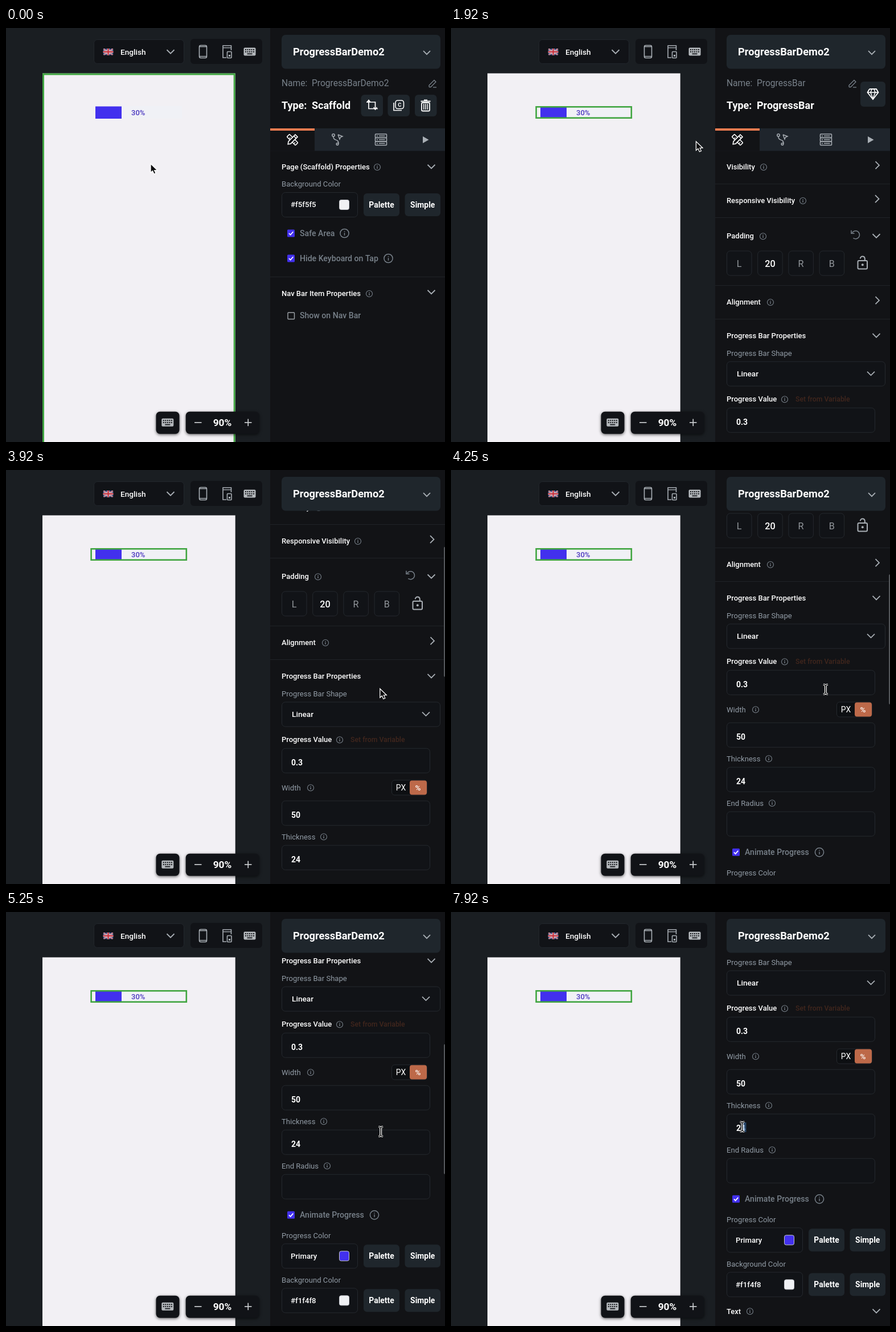
Recreate the animation shown at these times as an HTML page with a canvas. Size 771x726 px, loop 8 s.

```html
<!DOCTYPE html>
<html lang="en">
<head>
<meta charset="utf-8">
<title>Progress bar settings</title>
<style>
html, body { margin: 0; width: 100%; height: 100%; overflow: hidden; background: #121316; }
canvas { display: block; }
</style>
</head>
<body>
<canvas id="stage" width="771" height="726"></canvas>
<script>
const g = document.getElementById('stage').getContext('2d');
const LOOP = 8000, STEP = 1000 / 12;
const SELECT_AT = 830, PANEL_AT = 910, MARK_AT = 7740;

const C = {
  left: '#1a1e22', panel: '#121316', box: '#111317', raised: '#1f262c', edge: '#25292e',
  rule: '#202327', white: '#ffffff', label: '#929ca6', dim: '#78818a', icon: '#a9afb5',
  page: '#f2f0f4', green: '#40a540', blue: '#4230ee', orange: '#ee7b50', chip: '#bd6949'
};

// time, value
const SCROLL = [[3333, 0], [3417, 3], [3667, 85], [3917, 178], [4250, 315], [4583, 395],
  [4917, 424], [5250, 454], [5500, 482]];
// time, x, y, eased
const POINTER = [[0, 255, 239, 0], [830, 232, 150, 1], [1080, 232, 150, 0], [1917, 431.5, 200, 0],
  [2750, 657.5, 384, 0], [6500, 658.5, 385.5, 0], [7500, 511.5, 376.5, 1]];
const INPUTS = [666, 758, 836, 914];

function track(keys, t, i) {
  if (t <= keys[0][0]) return keys[0][i];
  for (let k = 1; k < keys.length; k++) {
    const a = keys[k - 1], b = keys[k];
    if (t < b[0]) {
      let p = (t - a[0]) / (b[0] - a[0]);
      if (b[3]) p = p * p * (3 - 2 * p);
      return a[i] + (b[i] - a[i]) * p;
    }
  }
  return keys[keys.length - 1][i];
}

function rect(x, y, w, h, color) {
  g.fillStyle = color;
  g.fillRect(x, y, w, h);
}

function box(x, y, w, h, r, fill, stroke, lw = 1) {
  g.beginPath();
  g.roundRect(x, y, w, h, r);
  if (fill) { g.fillStyle = fill; g.fill(); }
  if (stroke) { g.strokeStyle = stroke; g.lineWidth = lw; g.stroke(); }
}

// y is the middle of the capitals
function text(s, x, y, size = 13, color = C.white, weight = 500, align = 'left') {
  g.font = `${weight} ${size}px Roboto, sans-serif`;
  g.textAlign = align;
  g.fillStyle = color;
  g.fillText(s, x, y + size * 0.355 - 0.4);
}

function path(pts, color, lw = 1.6, fill) {
  g.beginPath();
  for (let i = 0; i < pts.length; i += 2) g.lineTo(pts[i], pts[i + 1]);
  if (fill) { g.closePath(); g.fillStyle = fill; g.fill(); }
  if (color) { g.strokeStyle = color; g.lineWidth = lw; g.stroke(); }
}

function circle(x, y, r, color, lw) {
  g.beginPath();
  g.arc(x, y, r, 0, 7);
  if (lw) { g.strokeStyle = color; g.lineWidth = lw; g.stroke(); }
  else { g.fillStyle = color; g.fill(); }
}

function at(x, y, draw, turn = 0) {
  g.save();
  g.translate(x, y);
  g.rotate(turn);
  draw();
  g.restore();
}

const down = (x, y, r = 6.5) => path([x - r, y - r / 2, x, y + r / 2, x + r, y - r / 2], C.icon, 1.8);
const right = (x, y) => path([x - 3.5, y - 6.5, x + 3, y, x - 3.5, y + 6.5], C.icon, 1.8);
const rule = y => rect(464, y, 307, 1, C.rule);

function info(x, y, r = 5.5) {
  circle(x, y, r, C.dim, r > 6 ? 1.5 : 1.1);
  rect(x - 0.7, y - r * 0.12, 1.4, r * 0.62, C.dim);
  rect(x - 0.7, y - r * 0.52, 1.4, 1.4, C.dim);
}

function keyboard(x, y) {
  box(x - 10.5, y - 7, 21, 14, 2, '#b4b8bc');
  for (let row = 0; row < 2; row++)
    for (let i = 0; i < 5; i++) rect(x - 8 + i * 3.5, y - 4.5 + row * 3.7, 2, 2, C.box);
  rect(x - 4.5, y + 3, 9, 1.7, C.box);
}

function flag(x, y) {
  g.save();
  g.beginPath();
  g.roundRect(x, y, 18, 11.5, 2);
  g.clip();
  rect(x, y, 18, 12, '#26346f');
  for (const [c, w] of [['#d8d6de', 2.4], ['#c8323e', 1]]) {
    path([x, y, x + 18, y + 12], c, w);
    path([x + 18, y, x, y + 12], c, w);
  }
  for (const [c, w] of [['#e2e0e6', 4.2], ['#c8323e', 2.4]]) {
    rect(x + 9 - w / 2, y, w, 12, c);
    rect(x, y + 5.8 - w / 2, 18, w, c);
  }
  g.restore();
}

function canvasArea(selected) {
  rect(0, 0, 464, 726, C.left);
  box(154.5, 20.5, 158, 42, 6, C.box, '#22272c');
  flag(170.5, 36);
  text('English', 201, 42.3, 13.6);
  down(289, 41.5);
  box(324, 19, 126, 44, 6, C.box);
  box(339.5, 30.5, 13, 22, 2.5, null, C.icon, 1.6);
  rect(340, 32, 12, 1.4, C.icon);
  rect(340, 49, 12, 1.4, C.icon);
  path([387, 52, 381, 52, 381, 31, 395.5, 31, 395.5, 39], C.icon, 1.6);
  rect(381, 34, 14, 1.3, C.icon);
  box(388.5, 41.5, 7.5, 11, 1, null, C.icon, 1.6);
  rect(391, 47, 3, 3, C.icon);
  keyboard(428, 41.5);

  rect(64, 79.5, 338.7, 647, C.page);
  rect(157, 137, 152, 22, '#f0f1f6');
  rect(157, 137.5, 46, 21.5, C.blue);
  text('30%', 220, 148.7, 13, '#4b38c0');
  g.strokeStyle = C.green;
  g.lineWidth = selected ? 2.6 : 3;
  if (selected) g.strokeRect(149.6, 138.3, 167.2, 19.4);
  else g.strokeRect(65.5, 81, 335.7, 660);

  g.save();
  g.shadowColor = 'rgba(0,0,0,.6)';
  g.shadowBlur = 5;
  g.shadowOffsetY = 1.5;
  box(263.5, 672.7, 41, 39, 7, C.box);
  box(315.7, 672.7, 129, 39, 7, C.box);
  g.restore();
  keyboard(283.8, 691.7);
  rect(331, 691, 12.5, 1.7, '#c8cbce');
  text('90%', 380, 692.5, 17.3, C.white, 700, 'center');
  rect(419, 691, 12.5, 1.7, '#c8cbce');
  rect(424.4, 685.6, 1.7, 12.5, '#c8cbce');
}

function pencil(x, y) {
  path([x - 6, y + 6, x - 6, y + 3, x + 3, y - 6, x + 6, y - 3, x - 3, y + 6, x - 6, y + 6], C.dim, 1.3);
  path([x + 1, y + 6.5, x + 7, y + 6.5], C.dim, 1.3);
}

function tabs() {
  rect(464, 176, 307, 39.5, '#1f252c');
  rect(464, 176, 78, 39.5, C.panel);
  rect(464, 176, 78, 4, C.orange);
  at(503, 196, () => {
    box(-3.2, -10.5, 6.4, 21, 1, C.panel, C.white, 1.6);
    for (const y of [-6, -2, 2, 6]) rect(-3, y, 3.3, 1.3, C.white);
  }, -Math.PI / 4);
  at(503, 196, () => {
    path([-2.8, -10, 2.8, -10, 2.8, 7, 0, 11, -2.8, 7, -2.8, -10], C.white, 1.6, C.panel);
    path([-2.8, -6.5, 2.8, -6.5], C.white, 1.5);
  }, Math.PI / 4);
  circle(575, 188, 2.2, C.icon, 1.5);
  g.beginPath();
  g.moveTo(575, 191);
  g.bezierCurveTo(575, 199, 584, 193, 584, 203);
  g.stroke();
  circle(582, 203.5, 1.8, C.icon, 1.5);
  path([583, 187, 591, 190, 587.5, 191.5, 586, 195, 583, 187], C.icon, 1.4);
  for (const y of [186, 192.5, 199]) {
    box(648.5, y, 20, 6.5, 1, null, C.icon, 1.5);
    rect(651, y + 2.5, 1.8, 1.8, C.icon);
    rect(655, y + 2.6, 10.5, 1.4, C.icon);
  }
  path([732, 190, 732, 202, 742.5, 196], null, 1, C.icon);
}

function field(y, value) {
  box(484.5, y + .2, 260, 43, 6, C.box, C.edge);
  text(value, 501, y + 25, 14, C.white, 700);
}

function heading(s, y, infoX) {
  text(s, 484, y);
  if (infoX) info(infoX, y);
}

function label(s, y, infoX) {
  text(s, 484, y, 13.1, C.label, 400);
  if (infoX) info(infoX, y);
}

function check(s, y, infoX, on) {
  if (on) {
    box(494, y - 6.5, 13, 13, 1.5, C.blue);
    path([497, y, 499.6, y + 2.8, 504.3, y - 2.7], C.white, 1.7);
  } else box(495, y - 5.5, 11.5, 11.5, 1, null, '#a0a5aa', 1.4);
  text(s, 516, y, 14.1, C.dim, 500);
  if (infoX) info(infoX, y, 7.6);
}

function button(s, x, w, y) {
  box(x, y - 20, w, 40, 6, C.raised);
  text(s, x + w / 2, y + .3, 13.9, C.white, 700, 'center');
}

function colorRow(y, name, color) {
  box(484.5, y - 21.5, 133, 43, 6, C.box, C.edge);
  text(name, 500, y, 13.2);
  box(585.5, y - 8.5, 17, 17, 3, color, '#c4c6cc');
  button('Palette', 628, 63, y);
  button('Simple', 700.5, 62.5, y);
}

function identity(name, type) {
  text('Name:', 484, 96.5, 15.6, C.dim, 400);
  text(name, 537, 96.5, 15.6, C.dim, 400);
  text('Type:', 484, 136.4, 18, C.white, 700);
  text(type, 537, 136.4, 18, C.white, 700);
}

function scaffoldPanel() {
  identity('ProgressBarDemo2', 'Scaffold');
  pencil(749, 97.5);
  for (const x of [623.5, 670.5, 718]) box(x, 117, 38.5, 38, 6, C.raised);
  path([633, 130, 648.5, 130, 648.5, 141], C.white, 1.7);
  path([637, 126, 637, 141.5, 653, 141.5], C.white, 1.7);
  path([645.5, 139, 648.5, 143, 651.5, 139], C.white, 1.6);
  path([634.2, 130, 637, 126.5, 640, 130], C.white, 1.6);
  box(684, 127, 14.5, 14.5, 4, null, C.white, 1.6);
  path([681, 131, 681, 144.5, 695, 144.5], C.white, 1.6);
  text('C', 691.3, 134.7, 9.5, C.white, 700, 'center');
  rect(728.5, 127.5, 17, 2, C.white);
  rect(734, 125.5, 6, 2, C.white);
  box(730, 131, 14, 14.5, 1.5, null, C.white, 1.8);
  for (const x of [733, 736.3, 739.6]) rect(x, 133, 1.5, 10, C.white);
  tabs();

  heading('Page (Scaffold) Properties', 244, 652);
  down(747, 243);
  label('Background Color', 274);
  colorRow(310, '#f5f5f5', '#f1f1f3');
  check('Safe Area', 360, 594.5, true);
  check('Hide Keyboard on Tap', 404, 671.5, true);
  rule(436);
  heading('Nav Bar Item Properties', 466, 638);
  down(747, 463);
  check('Show on Nav Bar', 504.5, 0, false);
}

function barPanel(marked) {
  identity('ProgressBar', 'ProgressBar');
  pencil(705, 97.5);
  box(719, 94, 44, 44, 6, C.raised);
  path([735, 107, 747, 107, 750.5, 113, 741, 125, 731.5, 113, 735, 107], C.white, 1.8);
  path([731.5, 113, 750.5, 113], C.white, 1.6);
  path([739, 107, 737, 113, 741, 124, 745, 113, 743, 107], C.white, 1.5);
  tabs();

  heading('Visibility', 244, 549);
  right(749, 240.7);
  rule(273);
  heading('Responsive Visibility', 303, 618);
  right(748.5, 299.7);
  rule(332);
  heading('Padding', 365.2, 548);
  g.beginPath();
  g.arc(710.5, 362.7, 7, -2.6, 2.2);
  g.strokeStyle = C.dim;
  g.lineWidth = 1.5;
  g.stroke();
  path([703, 354.7, 703, 360.2, 708.5, 360.2], C.dim, 1.5);
  down(747, 364.5);
  ['L', '20', 'R', 'B'].forEach((s, i) => {
    const x = 484.5 + i * 54.2, set = s === '20';
    box(x, 391, 43.5, 43, 6, C.box, C.edge);
    text(s, x + 21.7, 414, 16.2, set ? C.white : '#92979c', set ? 500 : 400, 'center');
  });
  box(714.5, 408, 16.5, 14.5, 2, null, C.icon, 2);
  circle(722.8, 415.2, 2, C.icon);
  g.beginPath();
  g.arc(722.8, 404.5, 4, Math.PI, -0.2);
  g.strokeStyle = C.icon;
  g.lineWidth = 2;
  g.stroke();
  path([726.8, 403.5, 726.8, 408], C.icon, 2);
  rule(451);
  heading('Alignment', 481, 561);
  right(749, 477.7);
  rule(510);

  heading('Progress Bar Properties', 540, 0);
  down(747, 539.2);
  label('Progress Bar Shape', 570.3);
  box(484.5, 585, 278, 43, 6, C.box, C.edge);
  text('Linear', 502, 606.8, 13.7);
  down(737.5, 605.8);
  heading('Progress Value', 651.2, 586);
  text('Set from Variable', 605, 651.2, 12.3, '#41261d', 500);
  field(666, '0.3');
  label('Width', 735.3, 535);
  box(677.5, 722, 62, 26, 5, '#0d0f12', C.edge);
  box(709, 722.5, 30, 25, 4, C.chip);
  text('PX', 693.5, 735.5, 14, C.white, 400, 'center');
  text('%', 723.5, 735.5, 13.5, C.white, 500, 'center');
  field(758, '50');
  label('Thickness', 821.3, 558);
  field(836, '24');
  if (marked) {
    rect(510, 851, 8.5, 17, 'rgba(58,116,180,.5)');
  }
  label('End Radius', 899.3, 564);
  field(914, '');
  check('Animate Progress', 985.3, 647, true);
  label('Progress Color', 1021.3);
  colorRow(1057.3, 'Primary', C.blue);
  label('Background Color', 1099.3);
  colorRow(1135.3, '#f1f4f8', '#f0f1f4');
  heading('Text', 1182.3, 525);
  down(747, 1181.7);
}

function arrow(x, y) {
  at(x, y, () => path([-1, -1, -1, 14.5, 2.5, 11.5, 5, 17, 8, 15.6, 5.6, 10.5, 10.5, 10.3, -1, -1],
    '#ffffff', 1.3, '#0a0a0c'));
}

function beam(x, y) {
  for (const [c, w] of [['#ffffff', 4], ['#111111', 1.6]]) {
    path([x, y - 7, x, y + 7], c, w);
    for (const d of [-1, 1])
      path([x - 4, y + 8.5 * d, x - 1.5, y + 8 * d, x, y + 6 * d, x + 1.5, y + 8 * d, x + 4, y + 8.5 * d], c, w * .8);
  }
}

function draw(t) {
  const scroll = Math.round(track(SCROLL, t, 1));
  canvasArea(t >= SELECT_AT);

  rect(464, 0, 307, 726, C.panel);
  g.save();
  g.beginPath();
  g.rect(464, 68, 307, 646);
  g.clip();
  g.translate(0, -scroll);
  if (t < PANEL_AT) scaffoldPanel();
  else barPanel(t >= MARK_AT);
  g.restore();

  box(484, 12, 279, 59.5, 7, C.raised);
  text('ProgressBarDemo2', 504, 42.3, 18.3, C.white, 700);
  down(739, 43.2, 6);

  if (t > 3450 && t < 6250) {
    g.globalAlpha = Math.min(1, (6250 - t) / 300);
    box(769, 72 + scroll * 0.352, 4, 228, 2, '#54575b');
    g.globalAlpha = 1;
  }

  const x = track(POINTER, t, 1), y = track(POINTER, t, 2);
  const overInput = x > 484 && x < 745 && t > PANEL_AT &&
    INPUTS.some(top => y + scroll > top && y + scroll < top + 44);
  (overInput ? beam : arrow)(x, y);
}

const start = performance.now();
function tick() {
  const t = (performance.now() - start) % LOOP;
  draw(Math.floor((t + 4) / STEP) % 96 * STEP);
  requestAnimationFrame(tick);
}
tick();
</script>
</body>
</html>
```
